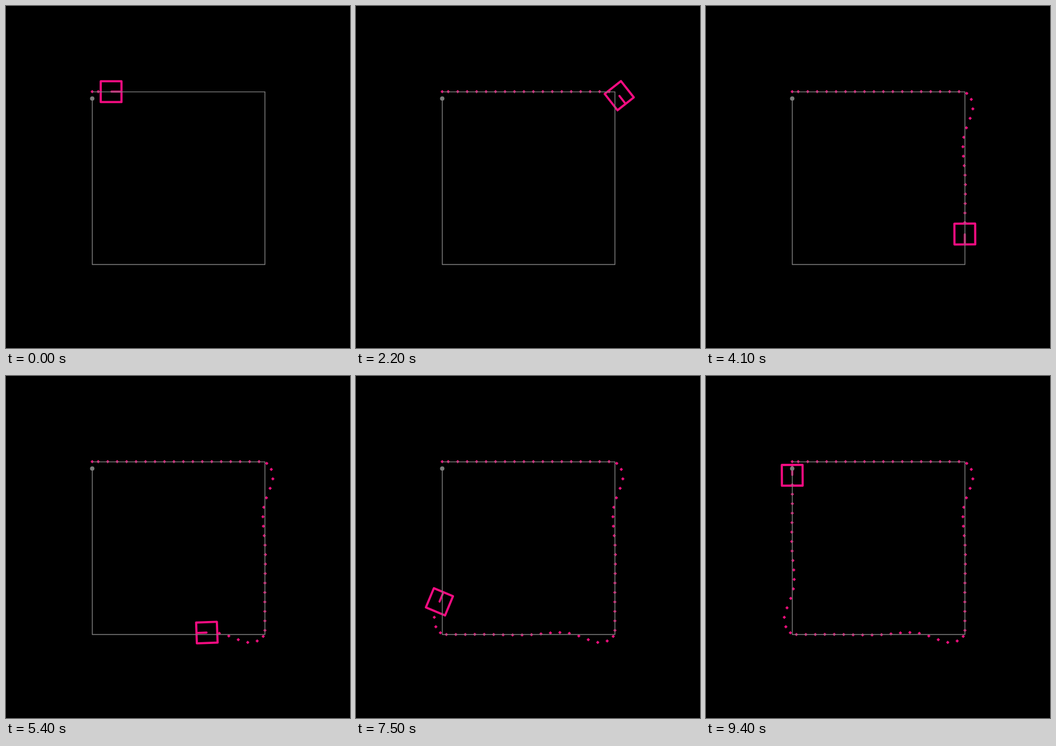
An HTML page that plays this animation: 600 by 596 pixels, repeating every 9500 ms.

```html
<!DOCTYPE html>
<html lang="en">
<head>
<meta charset="utf-8">
<title>Square track</title>
<style>
html, body { margin: 0; width: 100%; height: 100%; overflow: hidden; background: #000; }
svg { display: block; width: 600px; height: 596px; }
</style>
</head>
<body>
<svg viewBox="0 0 600 596" fill="none">
  <g id="trail" fill="#ec0f7c"></g>
  <g id="robot" stroke="#f40c81" stroke-linejoin="round" stroke-linecap="round">
    <rect x="-18.1" y="-18.1" width="36.2" height="36.2" stroke-width="3.8"/>
    <path d="M0.5 0H17" stroke-width="3.6"/>
  </g>
  <path d="M150.5 149.6H451.6V450.5H150.5V161" stroke="#808080" stroke-width="1.4"/>
  <circle cx="150.4" cy="161.3" r="3.8" fill="#7c7c7c"/>
</svg>
<script>
const LOOP = 9500, STEP = 100;
const CX = 301, CY = 299.9, HALF = 150.6;
const PER_SIDE = 19, LAST = 74;     // dots on each side, end of the drive
const START = 2.36, RATE = 0.777;   // drive in dots, per step

// After each turn the robot swings out and settles back on the line.
const swing = u => 26 * Math.exp(-u / 50) * Math.sin(Math.PI * u / 71);

function spot(i) {
  const side = Math.floor(i / PER_SIDE), n = i % PER_SIDE;
  const a = side * Math.PI / 2, dx = Math.cos(a), dy = Math.sin(a);
  const u = Math.max(0, 16.5 * n - 6) + (side ? 3 : 0);
  const along = u - HALF, out = HALF + (side ? swing(u) : 0);
  return [CX + dx * along + dy * out, CY + dy * along - dx * out];
}

const pts = Array.from({ length: LAST + 1 }, (_, i) => spot(i));

// Catmull-Rom position and heading at place k on the trail
function pose(k) {
  const i = Math.min(Math.floor(k), LAST - 1), u = k - i;
  const q = [i - 1, i, i + 1, i + 2].map(j => pts[Math.max(0, Math.min(LAST, j))]);
  const axis = d => {
    const [a, b, c, e] = q.map(p => p[d]);
    const k1 = c - a, k2 = 2 * a - 5 * b + 4 * c - e, k3 = 3 * b - a - 3 * c + e;
    return [b + (k1 + (k2 + k3 * u) * u) * u / 2, k1 + (2 * k2 + 3 * k3 * u) * u];
  };
  const [x, dx] = axis(0), [y, dy] = axis(1);
  return { x, y, angle: Math.atan2(dy, dx) * 180 / Math.PI };
}

const trail = document.getElementById("trail");
const robot = document.getElementById("robot");
const dots = pts.slice(0, LAST).map(([x, y]) => {
  const dot = document.createElementNS("http://www.w3.org/2000/svg", "path");
  dot.setAttribute("d", `M${x - 3} ${y}l2 -2l1 -1l1 1l2 2l-2 2l-1 1l-1 -1z`);
  return trail.appendChild(dot);
});

function draw(ms) {
  const step = Math.floor(ms % LOOP / STEP);
  const k = Math.min(LAST, START + RATE * step);
  const { x, y, angle } = pose(k);
  robot.setAttribute("transform", `translate(${x} ${y}) rotate(${angle})`);
  dots.forEach((dot, i) => dot.setAttribute("visibility", i < k - 0.7 ? "visible" : "hidden"));
}

let start;
function tick(now) {
  start ??= now;
  draw(now - start);
  requestAnimationFrame(tick);
}
draw(0);
requestAnimationFrame(tick);
</script>
</body>
</html>
```
